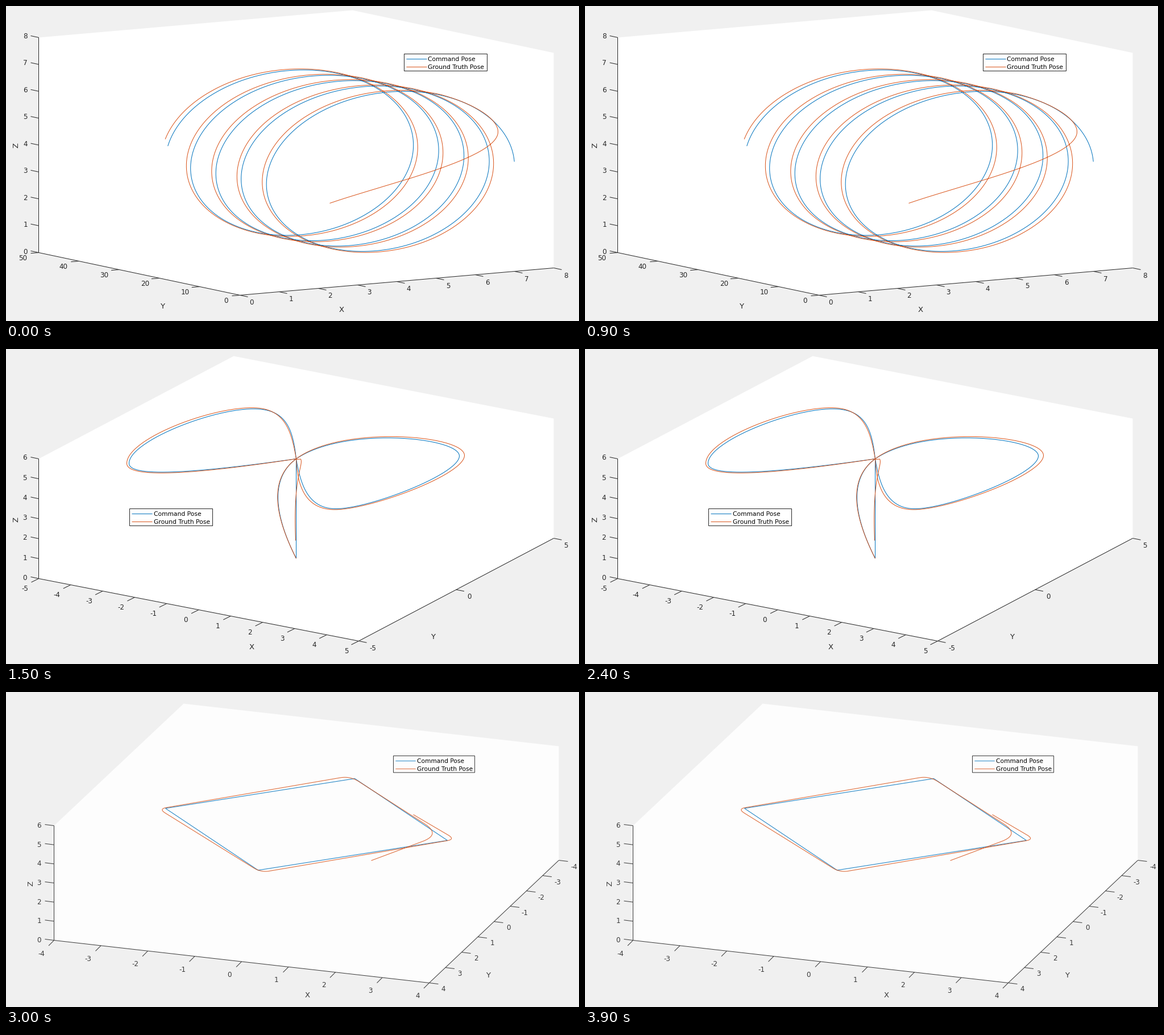
These frames come from a looping animation (1008 by 555 pixels, 4.5 s). A matplotlib script:

```python
import numpy as np
import matplotlib.pyplot as plt
from matplotlib.animation import FuncAnimation

W, H, DPI = 1008, 555, 96
PX = 72 / DPI
BLUE, ORANGE, BACK = "#0072bd", "#d95319", "#f0f0f0"

plt.rcParams["font.family"] = "DejaVu Sans"
fig = plt.figure(figsize=(W / DPI, H / DPI), dpi=DPI, facecolor=BACK)
ax = fig.add_axes([0, 0, 1, 1])


def bezier(*points, n=60):
    """Chain of cubic Bezier curves; neighbours share their end point."""
    p = np.array(points, float)
    u = np.linspace(0, 1, n)[:, None]
    v = 1 - u
    return np.vstack([v**3 * p[i] + 3*u*v*v * p[i + 1] + 3*u*u*v * p[i + 2]
                      + u**3 * p[i + 3] for i in range(0, len(p) - 1, 3)])


def rounded(start, corners, end):
    """Polyline whose corners (x, y, cut) are replaced by parabolas."""
    stops = [start] + [c[:2] for c in corners] + [end]
    stops = np.array(stops, float)
    u = np.linspace(0, 1, 20)[:, None]
    path = [stops[:1]]
    for before, c, after, (_, _, cut) in zip(stops, stops[1:], stops[2:], corners):
        a, b = (c + cut * (q - c) / np.hypot(*(q - c)) for q in (before, after))
        path.append((1 - u)**2 * a + 2*u*(1 - u) * c + u*u * b)
    return np.vstack(path + [stops[-1:]])


def line(points, color, alpha=1, width=1, z=2):
    x, y = np.array(points, float).T
    ax.plot(x, y, color=color, lw=width * PX, alpha=alpha, zorder=z,
            solid_capstyle="butt", snap=False)


def label(x, y, text, size, color, ha="center", turn=0):
    drop = 0.365 * size
    dx, dy = (drop, 0) if turn else (0, drop)
    ax.text(x + dx - 0.5, y + dy, text, size=size * PX, color=color, ha=ha,
            va="baseline", rotation=turn, rotation_mode="anchor", zorder=4)


def axis(start, end, values, tick, first, last, ink):
    """Axis edge with ticks and evenly spaced labels."""
    line([start, end], ink)
    n = len(values)
    spots = np.linspace(first, last, n)
    for value, p, (x, y) in zip(values, np.linspace(start, end, n), spots):
        line([p, p + np.array(tick)], ink)
        label(x, y, str(value), 12, ink)


def box(corners, names, white, ink):
    ax.add_patch(plt.Polygon(corners, closed=True, fc=white, ec="none"))
    for name, (x, y) in zip("XYZ", names):
        label(x, y, name, 13.2, ink, turn=90 if name == "Z" else 0)


def legend(x, y, white, ink, alpha=1, scale=1):
    ax.add_patch(plt.Rectangle((x, y), 146 * scale, 30 * scale, fc=white,
                               ec=ink, lw=PX, zorder=3, snap=False))
    rows = (("Command Pose", BLUE, 9), ("Ground Truth Pose", ORANGE, 23))
    for text, color, dy in rows:
        yy = round(y + dy * scale)
        line([(x + 4 * scale, yy), (x + 40 * scale, yy)], color, alpha, z=4)
        label(x + 42 * scale + 0.5, yy, text, 10.8 * scale, "black", ha="left")


def helix():
    ink = "#262626"
    box([(57, 55), (609, 7), (963, 82), (963, 461), (411, 509), (57, 434)],
        [(590, 534), (275, 528), (17, 245)], "white", ink)
    axis((57, 434), (57, 55), range(9), (-14, -3), (34, 432), (34, 52), ink)
    axis((411, 509), (57, 434), range(0, 51, 10), (-14, 1.2), (387, 518), (30, 443), ink)
    axis((411, 509), (963, 461), range(9), (14, 3), (432, 521), (985, 474), ink)

    def project(x, y, z):
        return np.c_[411 + 69*x - 7.08*y, 509 - 6*x - 1.5*y - 47.4*z]

    t = np.linspace(0.025, 28.1, 1500)
    line(project(4 + 3*np.cos(t), t, 4 + 3*np.sin(t)), BLUE)

    # the tracked path is slightly wider and sheared
    t = np.linspace(1.15, 28.03, 1500)
    c, s = np.cos(t), np.sin(t)
    track = project(4 + 3.108*c - 0.05*s, t, 4 + 3.05*s - 0.05*c)
    entry = bezier((569, 347), (670, 312), (866, 268), (865, 221),
                   (865, 198), (822, 171), track[0])
    line(np.vstack([entry, track]), ORANGE)
    legend(700, 84, "white", ink)


def petals():
    ink = "#262626"
    box([(57, 193), (400, 12), (963, 122), (963, 333), (620, 514), (57, 404)],
        [(432, 524), (751, 506), (17, 300)], "white", ink)
    axis((57, 404), (57, 193), range(7), (-14, -3), (33, 402), (33, 190.5), ink)
    axis((57, 404), (620, 514), range(-5, 6), (-13, 6.5), (33, 421), (599, 531), ink)
    axis((620, 514), (963, 333), (-5, 0, 5), (14, 2.8), (645, 526), (985, 345), ink)

    # all curves are relative to the hub where the petals meet
    hub, base = (0, 0), (0, 175.5)
    command = [
        bezier(hub, (-6, -54), (-18, -88), (-75, -88), (-150, -88),
               (-294, -30), (-294, 8), (-294, 32), (-190, 27), hub),
        bezier(hub, (85, -58), (287, -38), (287, -5), (287, 27),
               (128, 88), (70, 88), (22, 88), (8, 48), hub),
        bezier(hub, (-47, 35), (-38, 100), base),
        [base, hub],
    ]
    truth = [
        bezier(hub, (-9, -54), (-22, -90), (-78, -90), (-155, -90),
               (-298, -34), (-298, 8), (-298, 34), (-190, 29), hub),
        bezier(hub, (80, -60), (296, -42), (296, -6), (296, 28),
               (130, 89.5), (68, 89.5), (16, 89.5), (2, 48), hub),
        bezier(hub, (-49, 36), (-38, 100), base),
        np.vstack([bezier((-1, 144), (-6, 30), (13, 12), (8, 0.5)), (0, 1)]),
    ]
    for color, strokes in ((BLUE, command), (ORANGE, truth)):
        for stroke in strokes:
            line(np.array(stroke) + (510, 193), color)
    legend(217, 281, "white", ink)


def square():
    ink, white, soft = "#3a3a3a", "#fdfdfd", 0.85
    box([(84, 235), (312, 20), (972, 95), (972, 296), (744, 512), (84, 437)],
        [(530, 533), (848, 498), (43, 337)], white, ink)
    axis((84, 437), (84, 235), range(7), (-16, -2), (58, 436), (58, 234), ink)
    axis((84, 437), (744, 512), range(-4, 5), (-9.5, 9.5), (62, 460), (724, 534), ink)
    axis((744, 512), (972, 296), range(4, -5, -1), (16, 2), (769, 522), (999, 307), ink)

    line([(613, 152), (280, 204.5), (443, 313.5), (776, 261), (613, 152)],
         BLUE, soft, 1.1)
    corners = [(765, 250.5, 35), (605, 147.5, 18), (268, 205.5, 14),
               (448, 317.5, 15), (790, 259, 15)]
    line(rounded((642, 296.5), corners, (716, 215.5)), ORANGE, soft, 1.1)
    legend(681, 112, white, ink, soft, 0.98)


scenes = (helix, petals, square)


def update(i):
    ax.clear()
    ax.set_axis_off()
    ax.set_xlim(-0.5, W - 0.5)
    ax.set_ylim(H - 0.5, -0.5)
    scenes[i]()
    return ()


anim = FuncAnimation(fig, update, frames=len(scenes), interval=1500,
                     repeat=True, repeat_delay=0)
plt.show()
```
